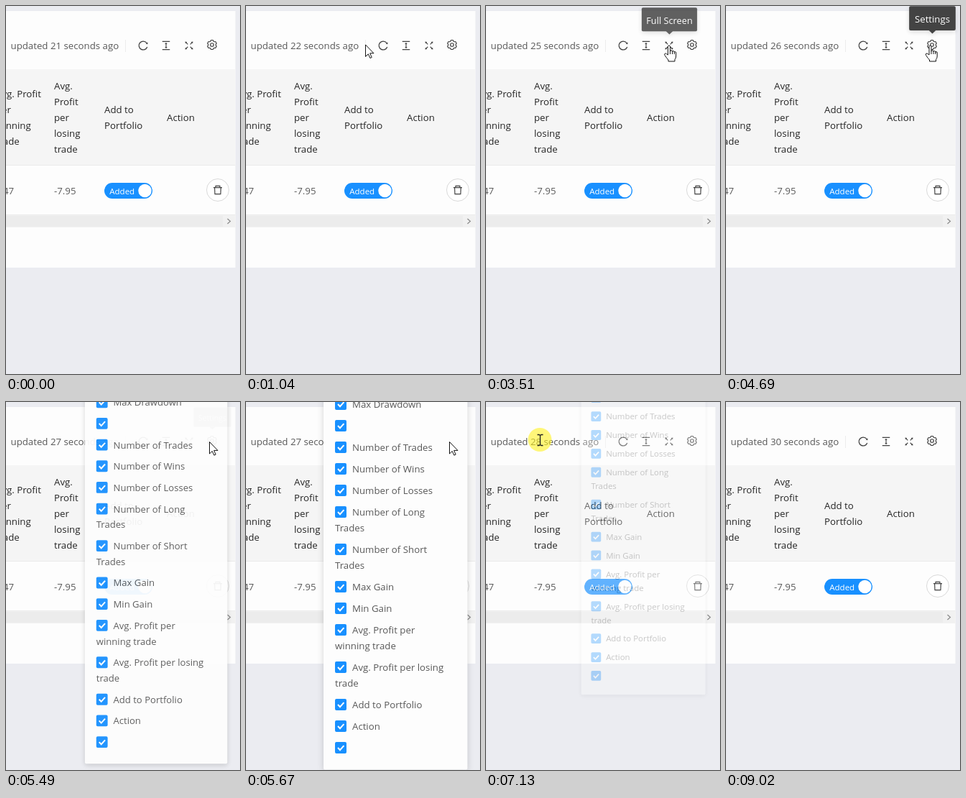
Write an HTML page that moves like this. It is 326x512 px and loops after 9.22 s.

```html
<!DOCTYPE html>
<html lang="en">
<head>
<meta charset="utf-8">
<title>Table toolbar</title>
<style>
html, body { margin: 0; width: 100%; height: 100%; overflow: hidden; background: #ebecf1; }
svg { display: block; width: 100%; height: 100%; }
text { font: 13.25px 'Open Sans', 'Noto Sans', sans-serif; fill: #595959; white-space: pre; }
.head text { fill: #262626; }
.tip { filter: drop-shadow(0 2px 4px rgba(0,0,0,.15)); }
.tip text { fill: #fff; text-anchor: middle; }
.panel { filter: drop-shadow(0 2px 4px rgba(0,0,0,.17)); }
</style>
</head>
<body>
<svg id="stage" viewBox="0 0 326 512" xmlns="http://www.w3.org/2000/svg">
  <rect width="326" height="512" fill="#ebecf1"/>
  <rect y="7" width="319.5" height="357" fill="#fdfdfd"/>
  <rect y="88" width="319.5" height="133" fill="#f5f5f5"/>
  <path d="M0 221.5H319.5M0 290.5H319.5" stroke="#ebebeb"/>
  <rect y="291" width="319.5" height="17" fill="#f1f1f1"/>
  <rect y="292" width="302" height="15" fill="#ececec"/>
  <path d="M308.5 296L312.5 299.5L308.5 303" fill="none" stroke="#8a8a8a" stroke-width="1.2"/>
  <path d="M166.5 47V64" stroke="#ededed"/>
  <text id="updated" x="6.5" y="60"></text>
  <g id="head" class="head"></g>
  <text x="-4" y="262">47</text>
  <text x="67" y="262">-7.95</text>
  <rect x="137" y="246" width="67" height="22" rx="11" fill="#1890ff"/>
  <circle cx="193.5" cy="257" r="9.2" fill="#fff"/>
  <text x="144.3" y="261.7" style="font-size:11.5px;fill:#fff">Added</text>
  <circle cx="295" cy="256" r="15.5" fill="#fff" stroke="#d9d9d9"/>
  <g id="icons"></g>
  <g id="panel" class="panel"></g>
  <g id="tips"></g>
  <circle id="click" r="16.5" fill="#fff21a"/>
  <g id="cursor">
    <path id="arrow" d="M.5 .5V17L4.3 13.4L6.9 19.1L9.2 18.1L6.7 12.4H12Z" fill="#fff" stroke="#111" stroke-linejoin="round"/>
    <g id="hand" transform="translate(1.5 0)" stroke="#111" stroke-linejoin="round" fill="#fff">
      <path d="M-1.5 13V1.5a1.5 1.5 0 0 1 3 0V8q0-1.2 1.5-1.2T4.5 8v.6q0-1 1.4-1T7.3 9v.6q0-1 1.2-1T9.7 10v5q0 2.5-1.7 4.5V22H-1v-2Q-3 18-6 13.4q-.9-1.6.4-2.2t2.3.5Z"/>
      <path d="M1.5 8V12M4.5 8.5V12M7.3 9.5V12" fill="none"/>
    </g>
    <path id="beam" d="M-4-7H-1.5L0-6L1.5-7H4M0-6V7M-4 8H-1.5L0 7L1.5 8H4" fill="none" stroke="#222" stroke-width="1.3"/>
  </g>
</svg>
<script>
const LOOP = 9220;
const $ = id => document.getElementById(id);
const clamp = v => Math.min(1, Math.max(0, v));
const smooth = v => v * v * (3 - 2 * v);

function bezier(x1, y1, x2, y2) {
  const at = (a, b, u) => 3 * (1 - u) ** 2 * u * a + 3 * (1 - u) * u * u * b + u ** 3;
  return x => {
    let lo = 0, hi = 1;
    for (let i = 0; i < 24; i++) {
      const mid = (lo + hi) / 2;
      if (at(x1, x2, mid) < x) lo = mid; else hi = mid;
    }
    return at(y1, y2, lo);
  };
}
const easeEnter = bezier(.08, .82, .17, 1);
const easeLeave = bezier(.78, .14, .15, .86);

// 0..1 presence of a part that zooms in at `from` and out at `to`
function presence(t, from, to, length) {
  if (t < from || t >= to + length) return 0;
  return t < to ? easeEnter(clamp((t - from) / length))
                : 1 - easeLeave((t - to) / length);
}

function zoom(el, p, ox, oy) {
  const s = .8 + .2 * p;
  el.style.display = p > 0 ? '' : 'none';
  el.setAttribute('opacity', p);
  el.setAttribute('transform', `translate(${ox} ${oy}) scale(${s}) translate(${-ox} ${-oy})`);
}

// Table header
const headings = [
  [-14, 127, ['Avg. Profit', 'per', 'winning', 'trade']],
  [67, 116, ['Avg.', 'Profit', 'per', 'losing', 'trade']],
  [137, 149, ['Add to', 'Portfolio']],
  [224, 160, ['Action']]
];
$('head').innerHTML = headings.map(([x, y, lines]) =>
  lines.map((s, i) => `<text x="${x}" y="${y + 22 * i}">${s}</text>`).join('')).join('');

// Icons share a 1024-unit box centred on 512,512
const INK = '#424242';
const line = (d, w = 76) => `<path d="${d}" fill="none" stroke="${INK}" stroke-width="${w}"/>`;
const solid = (d, more = '') => `<path d="${d}" fill="${INK}" ${more}/>`;
const icon = (x, y, body) =>
  `<g transform="translate(${x} ${y}) scale(${1 / 64}) translate(-512 -512)">${body}</g>`;

const corner = 'M290 236L340 186L160 160L186 340L236 290L376 430L430 376Z';
const gear = Array.from({ length: 24 }, (_, i) => {
  const r = [425, 425, 345, 345][i % 4];
  const a = (Math.floor(i / 4) * 60 + [-12, 12, 22, 38][i % 4] - 90) * Math.PI / 180;
  return `${(512 + r * Math.cos(a)).toFixed(1)} ${(512 + r * Math.sin(a)).toFixed(1)}`;
}).join('L');

$('icons').innerHTML = [
  icon(191, 55, line('M879 642A380 380 0 1 1 826 284', 84) + solid('M915 204L922 406L740 356Z')),
  icon(223, 55, solid('M176 112H848V184H176ZM176 838H848V912H176ZM510 232L622 378H548V646H622L514 790L402 646H476V378H398Z')),
  icon(255, 55, [0, 90, 180, 270].map(a => solid(corner, `transform="rotate(${a} 512 512)"`)).join('')),
  icon(287, 54, line(`M${gear}Z`) + `<circle cx="512" cy="512" r="145" fill="none" stroke="${INK}" stroke-width="76"/>`),
  icon(295, 256, line('M128 292H896M324 256V148H700V256M232 300L258 876H766L792 300'))
].join('');

// Column chooser
const columns = [
  'Max Drawdown', '', 'Number of Trades', 'Number of Wins', 'Number of Losses',
  'Number of Long|Trades', 'Number of Short|Trades', 'Max Gain', 'Min Gain',
  'Avg. Profit per|winning trade', 'Avg. Profit per losing|trade',
  'Add to Portfolio', 'Action', ''
];
let rowY = 3;
$('panel').innerHTML = '<rect x="108" y="-251" width="200.5" height="762.5" rx="2" fill="#fdfdfd"/>' +
  columns.map(label => {
    const [first, second] = label.split('|'), y = rowY;
    rowY += second ? 52 : 30;
    return `<rect x="124" y="${y - 8}" width="16" height="16" rx="2" fill="#1890ff"/>
      <path d="M128 ${y}l3 3.2l5.4-6" fill="none" stroke="#fff" stroke-width="2"/>
      <text x="148" y="${y + 5}">${first}</text>
      <text x="124" y="${y + 27}">${second || ''}</text>`;
  }).join('');

// Tooltips: label, centre, top, width, shown from, hidden from
const tips = [
  ['Refresh', 191.5, 1, 61, 1390, 2070],
  ['Density', 223.5, 1, 63, 2300, 3110],
  ['Full Screen', 255.5, 1, 80, 3487, 4340],
  ['Settings', 287.5, 0, 65, 4630, 5400]
].map(([label, x, y, w, from, to]) => {
  const el = document.createElementNS('http://www.w3.org/2000/svg', 'g');
  el.setAttribute('class', 'tip');
  el.innerHTML = `<rect x="${x - w / 2}" y="${y}" width="${w}" height="34" rx="2" fill="#404040"/>
    <path d="M${x - 5} ${y + 33.8}h10l-5 4.6Z" fill="#404040"/>
    <text x="${x}" y="${y + 23}">${label}</text>`;
  $('tips').append(el);
  return { el, x, y: y + 38, from, to };
});

// Pointer moves: start, end, x, y reached
const start = [-12, 66];
const moves = [
  [310, 1220, 186, 52],
  [1910, 2090, 221, 53],
  [2910, 3420, 253.5, 55],
  [4130, 4560, 283, 55],
  [6110, 6820, 75.5, 52.5]
];
function pointer(t) {
  let [x, y] = start;
  for (const [a, b, nx, ny] of moves) {
    const p = smooth(clamp((t - a) / (b - a)));
    x += (nx - x) * p;
    y += (ny - y) * p;
  }
  return [x, y];
}

// Click highlights: start, end, x, y
const clicks = [[4980, 5240, 283, 55], [7000, 7420, 75, 52.5]];

function shape(x, y, panelOpen) {
  if (panelOpen && x >= 108) return 'arrow';
  if (x > 5 && x < 159 && y < 65) return 'beam';
  return [191, 223, 255, 287].some(c => Math.abs(x - c) < 9) ? 'hand' : 'arrow';
}

function seconds(t) {
  const ticks = Math.max(0, Math.floor((t - 140) / 1020) + 1);
  return 21 + Math.min(8, ticks) + (t >= 8420 ? 1 : 0);
}

function draw(t) {
  $('updated').textContent = `updated ${seconds(t)} seconds ago`;

  const open = presence(t, 5400, 7026, 200);
  zoom($('panel'), open, 288, -251);
  for (const tip of tips) zoom(tip.el, presence(t, tip.from, tip.to, 100), tip.x, tip.y);

  const hit = clicks.find(c => t >= c[0] && t < c[1]);
  $('click').style.display = hit ? '' : 'none';
  if (hit) {
    const [a, b, x, y] = hit;
    $('click').setAttribute('cx', x);
    $('click').setAttribute('cy', y);
    $('click').setAttribute('opacity', .58 * clamp((t - a) / 60) * clamp((b - t) / 120));
  }

  const [x, y] = pointer(t);
  $('cursor').style.display = t >= 310 && t < 7980 ? '' : 'none';
  $('cursor').setAttribute('transform', `translate(${x} ${y})`);
  const kind = shape(x, y, open > 0);
  for (const id of ['arrow', 'hand', 'beam']) $(id).style.display = id === kind ? '' : 'none';
}

const began = performance.now();
function frame() {
  draw((performance.now() - began) % LOOP);
  requestAnimationFrame(frame);
}
frame();
</script>
</body>
</html>
```
